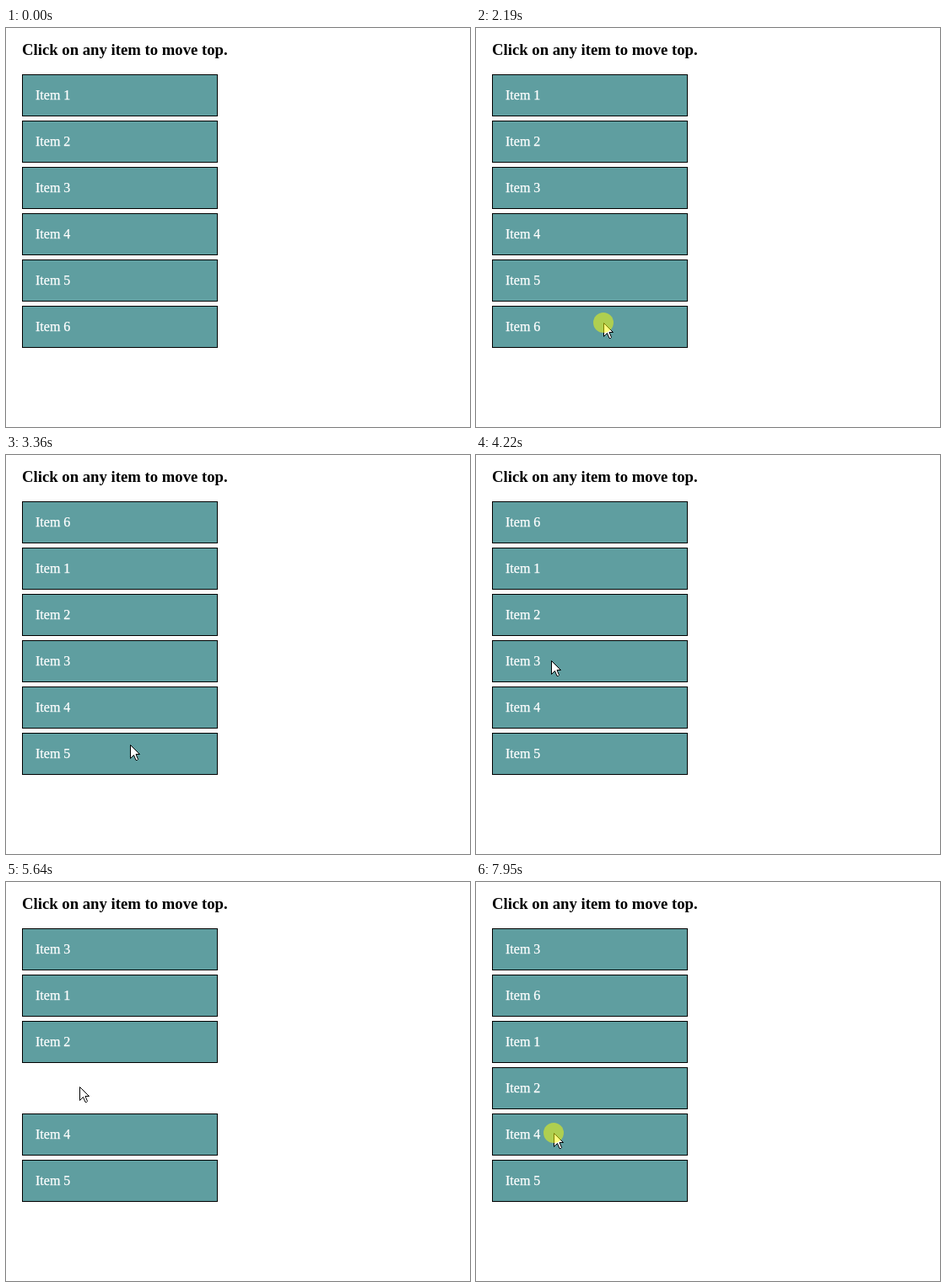
An HTML page that plays this animation: 550x474 px, repeating every 8000 ms.

```html
<!DOCTYPE html>
<html>
<head>
<meta charset="utf-8">
<style>
html, body { margin: 0; width: 100%; height: 100%; overflow: hidden; background: #fff; }
body { position: relative; font: 16px "Liberation Serif", "Times New Roman", serif; }
h3 { position: absolute; left: 19px; top: 15px; margin: 0; font-size: 18.72px; white-space: nowrap; }
.item {
  position: absolute; left: 19px; width: 232px; height: 50px; box-sizing: border-box;
  padding: 15px; border: 1px solid #000; background: cadetblue; color: #fff; line-height: 18px;
  -webkit-text-stroke: .25px #fff;
}
#pointer { position: absolute; left: 0; top: 0; z-index: 2; overflow: visible; }
</style>
</head>
<body>
<h3>Click on any item to move top.</h3>
<svg id="pointer" width="12" height="19">
  <path d="M.5 .5V16.5L4.5 12.5 7 18.5H8.5L9.5 17.5 7 11.5H11.5Z" fill="#fff" stroke="#000" stroke-linejoin="round"/>
  <circle id="press" r="12" fill="#ff0" fill-opacity=".5"/>
</svg>
<script>
const LOOP = 8000, TOP = 55, PITCH = 55;
const HOLD = 170, DELAY = 147, SLIDE = 500, REORDER = 705, STEP = 75;

const clicks = [{ at: 2182, item: 6 }, { at: 4990, item: 3 }, { at: 7950, item: 4 }];

// Pointer strokes: start time, end time, destination
const strokes = [
  [0, 810, 376, 396], [810, 1260, 258, 369], [1260, 1720, 151, 350],
  [3290, 3360, 147, 344], [3360, 4060, 93, 245], [4060, 4300, 87, 243],
  [6090, 6650, 92, 311], [6960, 7270, 92, 300], [7270, 7570, 92, 298]
];

const pointer = document.getElementById("pointer");
const press = document.getElementById("press");
const items = [1, 2, 3, 4, 5, 6].map(n => {
  const el = document.createElement("div");
  el.className = "item";
  el.textContent = "Item " + n;
  return document.body.appendChild(el);
});

// Each stroke advances in equal steps of about STEP ms
function pointerAt(t) {
  let x = 520, y = 474;
  for (const [start, end, toX, toY] of strokes) {
    if (t < start) break;
    const steps = Math.round((end - start) / STEP);
    const k = Math.min(1, Math.floor((t - start) / (end - start) * steps) / steps);
    x += (toX - x) * k;
    y += (toY - y) * k;
  }
  return [Math.round(x), Math.round(y)];
}

function draw(t) {
  let order = [1, 2, 3, 4, 5, 6], active = null, pressed = false;
  for (const c of clicks) {
    const age = t - c.at;
    if (age >= REORDER) order = [c.item, ...order.filter(n => n !== c.item)];
    else if (age >= HOLD) active = c;
    else if (age >= 0) pressed = true;
  }
  order.forEach((n, slot) => {
    const moving = active && active.item === n;
    const p = moving ? Math.min(1, (t - active.at - DELAY) / SLIDE) : 0;
    const eased = 0.5 - Math.cos(Math.PI * p) / 2;
    const style = items[n - 1].style;
    style.top = Math.round(TOP + PITCH * slot * (1 - eased)) + "px";
    style.opacity = moving && p < 1 ? 0.8 : 1;
    style.zIndex = moving ? 1 : 0;
  });
  const [x, y] = pointerAt(t);
  pointer.style.transform = `translate(${x}px, ${y}px)`;
  press.style.display = pressed ? "" : "none";
}

function frame() {
  draw(performance.now() % LOOP);
  requestAnimationFrame(frame);
}
frame();
</script>
</body>
</html>
```
